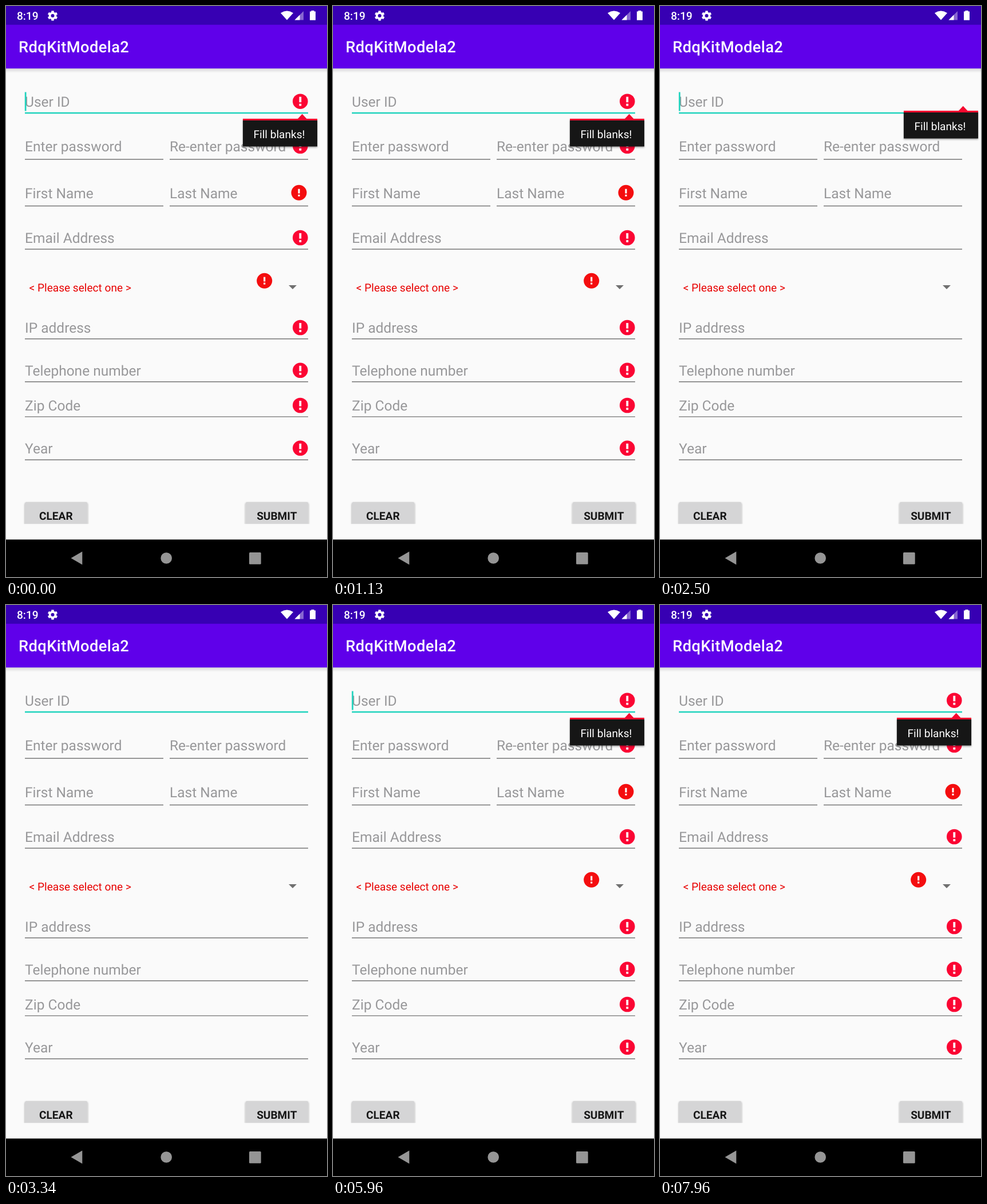
An HTML page that plays this animation: 561 px wide and 998 px high, repeating every 8 s.

```html
<!DOCTYPE html>
<html lang="en">
<head>
<meta charset="utf-8">
<title>Form validation</title>
<style>
  html, body { margin: 0; width: 100%; height: 100%; overflow: hidden; background: #fafafa; }
  svg { display: block; width: 561px; height: 998px; font-family: Roboto, "Noto Sans", sans-serif; text-rendering: geometricPrecision; }
  .hint { font-size: 24.5px; fill: #98989a; }
  .small { font-size: 19.1px; }
  .line { stroke: #757575; stroke-width: 1.4; }
  .button { font-size: 19.1px; font-weight: 700; fill: #161616; text-anchor: middle; }

  .cursor, .errors, .place { animation: 8s step-end infinite; }
  .cursor { animation-name: blink; }
  .errors { animation-name: errors; }
  .place { animation-name: place; }
  .popup { animation: fade 8s linear infinite; }

  @keyframes blink {
    0%, 17.4%, 30.3%, 43.6%, 58.4%, 74.5%, 88.125% { opacity: 1; }
    11%, 23.9%, 37.4%, 56.25%, 64.1%, 79.75%, 96.9%, 100% { opacity: 0; }
  }
  @keyframes errors {
    0%, 51.125%, 100% { opacity: 1; }
    31.125% { opacity: 0; }
  }
  /* the bubble jumps when its icon goes, then fades */
  @keyframes place {
    0%, 51.125%, 100% { transform: none; }
    31.125% { transform: translate(12px, -14px); }
  }
  @keyframes fade {
    0%, 31.9% { opacity: 1; }
    35%, 51.125% { opacity: 0; }
    52.4%, 100% { opacity: 1; }
  }
</style>
</head>
<body>
<svg viewBox="0 0 561 998" xmlns="http://www.w3.org/2000/svg">
  <defs>
    <linearGradient id="shade" x2="0" y2="1">
      <stop offset="0" stop-opacity=".14"/>
      <stop offset="1" stop-opacity="0"/>
    </linearGradient>
    <filter id="soft" x="-10%" y="-20%" width="120%" height="150%">
      <feDropShadow dx="0" dy="1.5" stdDeviation="1.4" flood-opacity=".4"/>
    </filter>
    <clipPath id="cut"><rect y="860" width="561" height="45.3"/></clipPath>
    <g id="bang" fill="#fff">
      <rect x="-1.9" y="-8" width="3.8" height="9.6"/>
      <rect x="-1.9" y="4.1" width="3.8" height="3.8"/>
    </g>
    <g id="alert"><circle r="13.3" fill="#fb0533"/><use href="#bang"/></g>
    <g id="alert2"><circle r="13.5" fill="#f40d0f"/><use href="#bang" transform="scale(.82)"/></g>
  </defs>

  <rect width="561" height="998" fill="#fafafa"/>
  <rect y="109" width="561" height="8" fill="url(#shade)"/>
  <rect width="561" height="109.2" fill="#5f00ea"/>
  <rect width="561" height="32.8" fill="#3700b3"/>
  <text x="22" y="81" font-size="27.3" font-weight="500" letter-spacing=".4" fill="#fff">RdqKitModela2</text>

  <g fill="#fff">
    <text x="19" y="23.5" font-size="19.1" font-weight="500">8:19</text>
    <g transform="translate(81.5 17)">
      <circle r="4.9" fill="none" stroke="#fff" stroke-width="3.8"/>
      <g id="teeth"></g>
    </g>
    <path d="M480 12.2Q491 4.8 502 12.2L491 24.5Z"/>
    <path d="M520 9V24.5H504.5Z" opacity=".4"/>
    <path d="M513.5 15.5V24.5H504.5Z"/>
    <path d="M533.5 9.5V8H538.5V9.5H541V24.7H531V9.5Z"/>
  </g>

  <g id="fields"></g>

  <path d="M33 187H528" stroke="#1fd3bd" stroke-width="2.7"/>
  <rect class="cursor" x="32.8" y="150.5" width="2.7" height="33" fill="#1fd3bd"/>

  <text class="small" x="40.5" y="498.7" fill="#e80000">&lt; Please select one &gt;</text>
  <path d="M494 488H508L501 495Z" fill="#707070"/>

  <g clip-path="url(#cut)">
    <g fill="#d5d5d6" filter="url(#soft)">
      <rect x="33" y="867" width="109.5" height="50" rx="2.7"/>
      <rect x="418.5" y="867" width="110" height="50" rx="2.7"/>
    </g>
    <text class="button" x="87.3" y="898.2">CLEAR</text>
    <text class="button" x="473.3" y="898.2">SUBMIT</text>
  </g>

  <g class="errors">
    <g id="alerts"></g>
    <use href="#alert2" x="512" y="326.3"/>
    <use href="#alert2" x="451.7" y="480.2"/>
  </g>

  <g class="place">
    <g class="popup">
      <rect x="414" y="198" width="130" height="47.5" fill="#171717" filter="url(#soft)"/>
      <path d="M414 197H510L517.7 188.7L525.4 197H544V200H414Z" fill="#f5092f"/>
      <text class="small" x="432.5" y="231" fill="#fff">Fill blanks!</text>
    </g>
  </g>

  <rect y="932.5" width="561" height="66"/>
  <g fill="#959595">
    <path d="M113.5 965L133.3 953.6V976.4Z"/>
    <circle cx="280.2" cy="965" r="9.8"/>
    <rect x="425" y="955" width="20.7" height="20.7" rx="1.5"/>
  </g>
</svg>
<script>
  const put = (id, html) => document.getElementById(id).innerHTML += html;

  // label, left, right, text baseline, underline
  const fields = [
    ['User ID', 33, 528, 176.3],
    ['Enter password', 33, 275, 254.3, 268],
    ['Re-enter password', 286, 528, 254.3, 268],
    ['First Name', 33, 275, 336, 349.5],
    ['Last Name', 286, 528, 336, 349.5],
    ['Email Address', 33, 528, 414.3, 425],
    ['IP address', 33, 528, 571.1, 581.7],
    ['Telephone number', 33, 528, 646.1, 656.8],
    ['Zip Code', 33, 528, 707.2, 717.9],
    ['Year', 33, 528, 782.4, 793.2]
  ];
  for (const [label, left, right, base, rule] of fields) {
    put('fields', `<text class="hint" x="${left}" y="${base}">${label}</text>`);
    if (rule) put('fields', `<path class="line" d="M${left} ${rule}H${right}"/>`);
  }

  for (const y of [166.7, 244.8, 405, 562, 636.8, 698, 772.8]) {
    put('alerts', `<use href="#alert" x="514.3" y="${y}"/>`);
  }

  for (let a = 0; a < 360; a += 60) {
    put('teeth', `<rect x="-2.2" y="-8.6" width="4.4" height="4" transform="rotate(${a})"/>`);
  }
</script>
</body>
</html>
```
